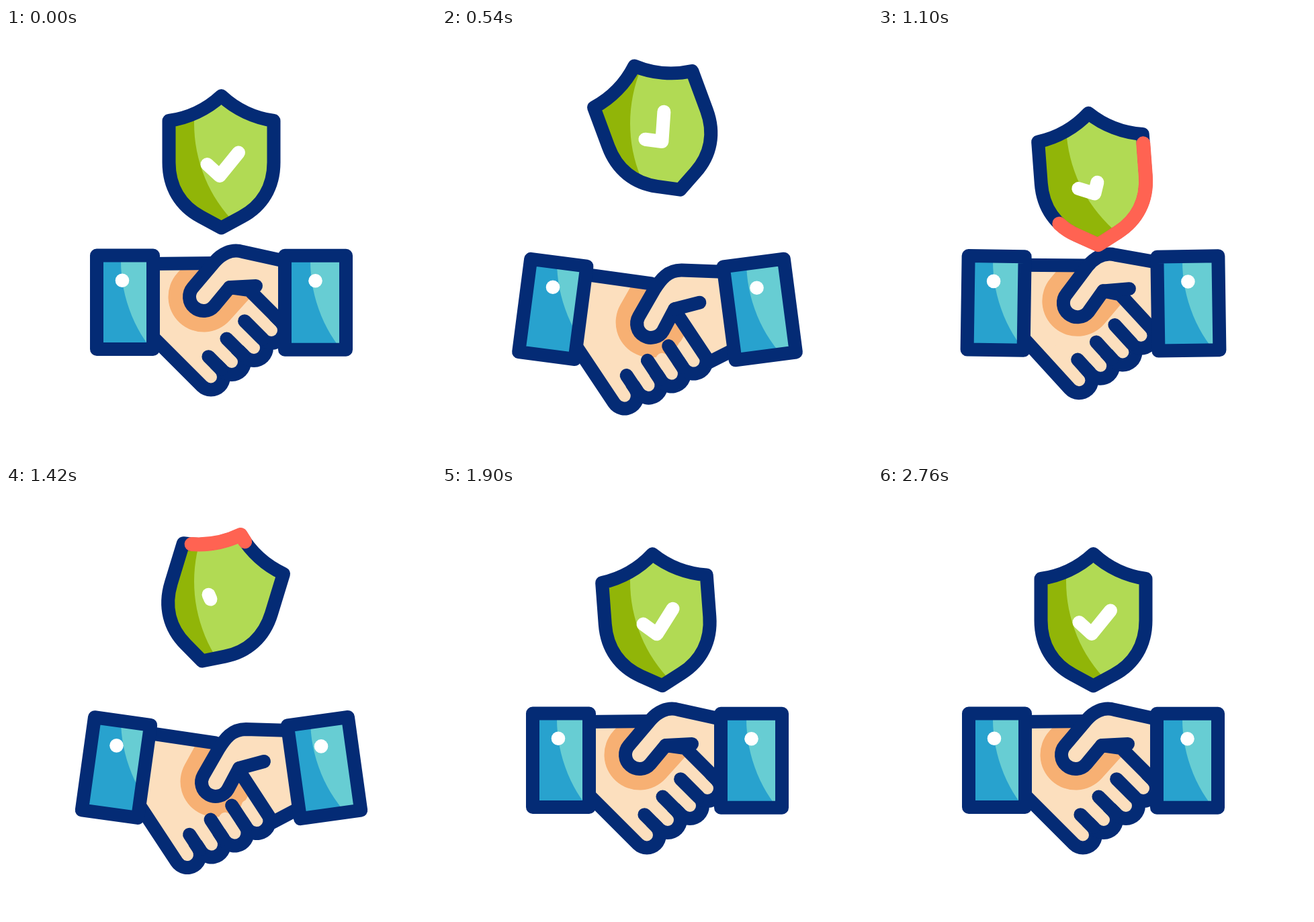
Recreate the animation shown at these times as an HTML page with a canvas. Size 640 px wide and 640 px high, loop 2820 ms.

```html
<!DOCTYPE html>
<html lang="en">
<head>
<meta charset="utf-8">
<title>Trusted handshake</title>
<style>
html, body { margin: 0; width: 100%; height: 100%; overflow: hidden; background: #fff; }
canvas { display: block; }
</style>
</head>
<body>
<canvas id="stage" width="640" height="640"></canvas>
<script>
const ctx = document.getElementById('stage').getContext('2d');
const LOOP = 2820;
const NAVY = '#042b75', SKIN = '#fcdfbe', SHADE = '#f7b073', WHITE = '#fff', RED = '#ff6352';
const BLUE = '#28a2ce', AQUA = '#67cdd3', GREEN = '#91b508', LIME = '#b1da54';
const RAD = Math.PI / 180;

// Keyframes: [time, value], eased between neighbours
const CUFF = [[210, 0], [600, 1], [1020, 0], [1420, 1], [1820, 0]];
const HAND = [[200, 0], [595, 1], [645, 1], [1000, 0], [1400, 1], [1470, 1], [1870, 0]];
const LIFT = [[140, 0], [540, -50.7], [1100, 25.5], [1490, -38], [1753, 0]];
const TILT = [[150, 0], [580, -20.8], [820, -21], [1430, 17], [1780, -6], [2180, 2], [2600, 0]];
const TICK_TILT = [[150, 0], [760, -21], [1060, -22], [1500, 10], [2000, -4], [2500, 0]];
const TICK_LEN = [[930, 1], [1330, 0], [1340, 0], [1740, 1]];
const RED_HEAD = [[740, 0], [1380, 1]];
const RED_TAIL = [[940, 0], [1580, 1]];

// Fingertips: rest x, y, then lowered x, y
const TIPS = [[305, 519.5, 270, 549], [336, 497, 306, 533.5], [369, 476, 340.5, 516.5], [395, 450, 373.5, 498]];
const GAP_DEPTHS = [27, 34, 38];

const SHIELD_D = 'M320.5 101C342 121 370 134 398.5 138V200C398.5 237 381 265 351 281' +
  'L320.5 297.5L290 281C260 265 242.5 237 242.5 200V138C271 134 299 121 320.5 101Z';
const shield = new Path2D(SHIELD_D);
const ruler = document.createElementNS('http://www.w3.org/2000/svg', 'path');
ruler.setAttribute('d', SHIELD_D);
const shieldLen = ruler.getTotalLength();

const mix = (a, b, k) => a + (b - a) * k;
const pose = (p, k) => [mix(p[0], p[2], k), mix(p[1], p[3], k)];
// Rotation runs slightly ahead of the drop
const swing = h => h + h * (1 - h) / 2;

function at(keys, t) {
  if (t <= keys[0][0]) return keys[0][1];
  for (let i = 1; i < keys.length; i++) {
    const [t0, a] = keys[i - 1], [t1, b] = keys[i];
    if (t < t1) {
      const u = (t - t0) / (t1 - t0);
      return mix(a, b, u * u * (3 - 2 * u));
    }
  }
  return keys[keys.length - 1][1];
}

function poly(points) {
  const path = new Path2D();
  points.forEach(p => path.lineTo(p[0], p[1]));
  return path;
}

function fill(path, color) {
  ctx.fillStyle = color;
  ctx.fill(path);
}

function stroke(path, color, width = 20) {
  ctx.strokeStyle = color;
  ctx.lineWidth = width;
  ctx.stroke(path);
}

function disc(x, y, r, color) {
  const path = new Path2D();
  path.arc(x, y, r, 0, 7);
  fill(path, color);
}

function drawPalm(c, h) {
  const angle = mix(45, 56.6, swing(h)) * RAD;
  const dx = Math.cos(angle), dy = Math.sin(angle);
  // Step along a finger, then sideways towards the thumb
  const move = (p, d, side = 0) => [p[0] + dx * d + dy * side, p[1] + dy * d - dx * side];
  const tips = TIPS.map(p => pose(p, h));
  const reach = i => i ? 26 : 110;

  tips.forEach((p, i) => stroke(poly([move(p, i ? -45 : -110), p]), NAVY, 58));

  const top = [pose([214, 351, 214, 368], c), pose([310, 350, 312, 382.5], c)];
  const palm = poly([
    ...top,
    pose([333, 386, 347, 420], h),
    pose([362, 390, 351, 430], h),
    move(tips[3], -12, 9),
    ...tips.map(p => move(p, -12)).reverse(),
    move(tips[0], -110)
  ]);
  fill(palm, SKIN);

  ctx.save();
  ctx.clip(palm);
  stroke(poly([pose([294, 400, 312, 440], h), pose([360, 327, 355, 362], h)]), SHADE, 105);
  ctx.restore();

  tips.forEach((p, i) => stroke(poly([move(p, -reach(i)), p]), SKIN, 18));
  GAP_DEPTHS.forEach((depth, i) => {
    const middle = pose([...tips[i], ...tips[i + 1]], 0.5);
    stroke(poly([move(middle, -depth), middle]), NAVY);
  });
  stroke(poly(top), NAVY);
}

function drawGrip(c, h) {
  const x = mix(294, 312, h), y = mix(400, 441, swing(h));
  const axis = mix(-49.5, -60.5, h) * RAD;
  const to = (...p) => pose(p, h);
  const bend = to(333, 386, 347, 420);

  const path = new Path2D();
  path.moveTo(...pose([420, 348, 424, 364], c));
  path.lineTo(...to(352, 333, 357, 362));
  path.bezierCurveTo(...to(335, 328, 336, 362), ...to(320, 337, 326, 376), ...to(310.5, 348, 316, 392));
  path.arc(x, y, 21, axis - Math.PI / 2, axis + Math.PI / 2, true);
  path.lineTo(...bend);
  path.lineTo(...to(362, 390, 351, 430));
  path.lineTo(...to(410, 438, 397, 500.5));
  path.lineTo(...to(420, 448, 434, 481));
  fill(path, SKIN);
  stroke(path, NAVY);
  stroke(poly([bend, to(372, 384, 384, 410)]), NAVY);
}

// The light patch stays fixed on the stage while its shape moves
function drawLit(path, base, light, matrix, litX, litY) {
  const shape = new Path2D();
  shape.addPath(path, matrix);
  fill(shape, base);
  ctx.save();
  ctx.clip(shape);
  disc(litX + 212, litY, 212, light);
  ctx.restore();
  stroke(shape, NAVY);
  return shape;
}

function drawCuff(x, y, w, hgt, side, c, litX) {
  const matrix = new DOMMatrix()
    .translate(x + side * 13 * c, y + 10.8 * c)
    .rotate(-side * 7.9 * c);
  const box = new Path2D();
  box.rect(-w / 2, -hgt / 2, w, hgt);
  drawLit(box, BLUE, AQUA, matrix, litX, 347);
  const dot = matrix.transformPoint(new DOMPoint(side < 0 ? -4 : 0, -32.5));
  disc(dot.x, dot.y, 10.3, WHITE);
}

function drawTick(t) {
  const len = at(TICK_LEN, t);
  if (len <= 0.001) return;
  const a = [299.5, 203], b = [318, 220], c = [346, 185.5];
  const first = Math.hypot(b[0] - a[0], b[1] - a[1]);
  const second = Math.hypot(c[0] - b[0], c[1] - b[1]);
  const drawn = len * (first + second);
  const k1 = Math.min(1, drawn / first), k2 = Math.max(0, (drawn - first) / second);
  const points = [a, pose([...a, ...b], k1)];
  if (k2) points.push(pose([...b, ...c], k2));

  ctx.translate(322, 213);
  ctx.rotate(at(TICK_TILT, t) * RAD);
  ctx.translate(-322, -213);
  stroke(poly(points), WHITE);
}

function drawShield(t) {
  const matrix = new DOMMatrix()
    .translate(320.5, 199.5 + at(LIFT, t))
    .rotate(at(TILT, t))
    .translate(-320.5, -199.5);
  const shape = drawLit(shield, GREEN, LIME, matrix, 280, 142);

  const head = at(RED_HEAD, t), tail = at(RED_TAIL, t);
  if (head - tail > 0.001) {
    const len = (head - tail) * shieldLen;
    ctx.setLineDash([len, shieldLen - len]);
    ctx.lineDashOffset = -(12 + tail * shieldLen);
    stroke(shape, RED, 21);
    ctx.setLineDash([]);
  }

  ctx.save();
  ctx.transform(matrix.a, matrix.b, matrix.c, matrix.d, matrix.e, matrix.f);
  drawTick(t);
  ctx.restore();
}

function frame() {
  const t = performance.now() % LOOP;
  const c = at(CUFF, t), h = at(HAND, t);
  ctx.fillStyle = WHITE;
  ctx.fillRect(0, 0, 640, 640);
  ctx.lineJoin = ctx.lineCap = 'round';
  drawPalm(c, h);
  drawGrip(c, h);
  drawCuff(177, 408.3, 84, 139.5, -1, c, 171);
  drawCuff(460.5, 408.8, 91, 140, 1, c, 453);
  drawShield(t);
  requestAnimationFrame(frame);
}
frame();
</script>
</body>
</html>
```
